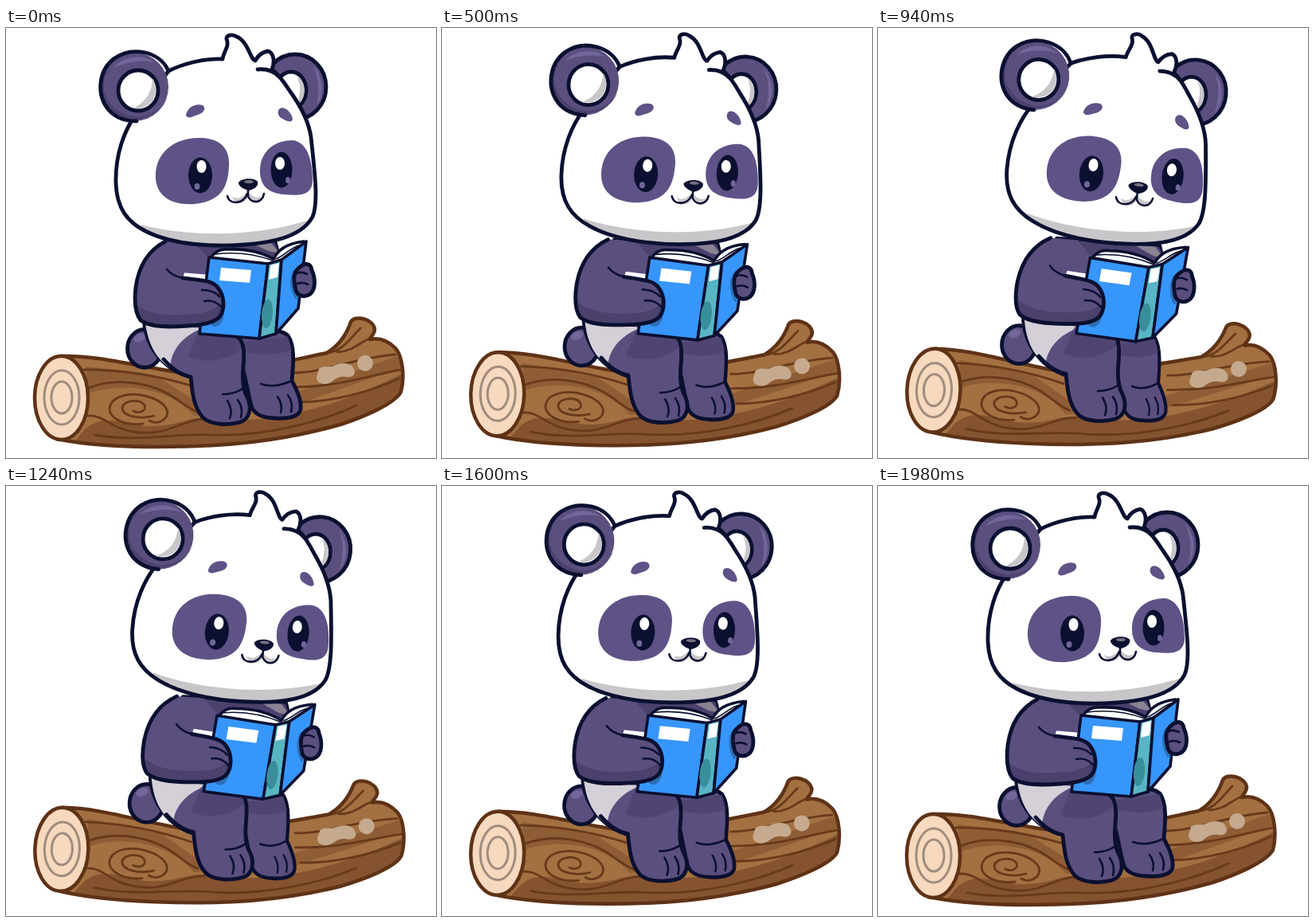
Animation, 540 px wide and 540 px high, one loop 2 s. Source, as an HTML page:

```html
<!DOCTYPE html>
<html lang="en">
<head>
<meta charset="utf-8">
<title>Reading panda</title>
<style>
html, body { margin: 0; height: 100%; overflow: hidden; background: #fff }
svg { display: block; width: 100vw; height: 100vh }
path, ellipse { stroke-linecap: round; stroke-linejoin: round }
.ink { stroke: #0b1030; stroke-width: 4.8 }
.edge { stroke: #0b1030; stroke-width: 3.6 }
.thin { stroke: #0b1030; stroke-width: 2.6; fill: none }
.fur { fill: #5b4f7f }
.dim { fill: #4b416c }
.lit { fill: #72669a }
.patch { fill: #5f5287 }
.white { fill: #fff }
.gray { fill: #c9c6ca }
.dark { fill: #0b1030 }
.bark { stroke: #5f3216; stroke-width: 4.5 }
.grain { stroke: #673a1b; stroke-width: 2.8; fill: none }
.ring { stroke: #a08b7f; stroke-width: 3; fill: none }
.none { fill: none }
</style>
</head>
<body>
<svg viewBox="0 0 540 540">
<defs>
  <clipPath id="logClip"><path id="logShape" d="M69 412C115 411 160 424 215 432C280 437 345 420 403 408C421 397 429 381 433 369C438 360 461 365 463 378C463 385 457 388 457 391C470 388 480 393 489 402C498 412 501 438 496 457C488 472 450 488 420 498C350 518 280 526 190 526C140 526 100 523 69 517Z"/></clipPath>
  <clipPath id="headClip"><path id="headShape" d="M162 110C148 130 137 160 138 195C139 226 152 244 177 256C212 273 262 275 300 272C345 269 374 258 385 237C393 219 387 175 383 137C380 116 370 98 357 80C350 69 343 59 334 52C338 42 336 31 329 29C322 30 317 34 313 41C307 40 304 17 290 11C284 7 276 9 277 14C281 23 273 30 272 39C248 38 222 45 204 54Z"/></clipPath>
  <clipPath id="armClip"><path id="armShape" d="M200 268C181 278 167 297 163 325C161 342 162 358 169 367C181 376 204 376 229 374C247 373 261 370 268 363C275 354 275 337 266 326C260 318 250 317 222 314L236 268Z"/></clipPath>
</defs>

<g id="log">
  <use href="#logShape" fill="#a37041"/>
  <g clip-path="url(#logClip)">
    <path fill="#85532f" d="M98 505C122 482 150 499 178 500C218 501 229 487 256 490C330 500 420 475 505 430V540H69Z"/>
    <path fill="#8f5d35" d="M100 425C125 428 150 432 195 441L240 470L360 459L500 409V425L360 475L236 487C205 450 145 445 104 459Z"/>
    <path class="grain" d="M98 429C140 429 185 435 232 449M104 452C142 437 188 447 214 466C226 474 231 479 241 482M103 487C121 485 132 503 160 507C204 514 218 492 250 491M112 511C165 521 215 508 260 511C330 513 400 493 440 474M362 433C402 432 438 414 489 410M363 451C420 450 458 436 496 429M370 470C410 469 455 458 494 440M403 408C422 407 433 389 445 377M416 407C435 407 446 393 457 390"/>
    <path class="grain" d="M172 497C148 500 130 490 130 478C131 464 150 458 170 461C192 465 206 476 202 487C197 496 186 497 180 493M186 487C166 492 146 487 146 477C147 467 170 465 174 474C177 480 168 485 160 481"/>
    <path fill="#c6aa8f" d="M393 428C398 423 407 427 412 424C420 420 429 420 434 424C442 433 437 440 426 438C418 437 413 441 408 445C398 450 389 445 390 438Z"/>
    <circle cx="451" cy="421" r="10" fill="#c6aa8f"/>
  </g>
  <use href="#logShape" class="bark none"/>
  <ellipse class="bark" cx="69.500" cy="464.500" rx="33.500" ry="52.500" fill="#f6d9be"/>
  <ellipse class="ring" cx="70" cy="464" rx="22" ry="34"/>
  <ellipse class="ring" cx="70" cy="464" rx="13" ry="20"/>
  <ellipse class="ink fur" cx="174" cy="402.500" rx="21.500" ry="24"/>
  <ellipse class="lit" cx="168" cy="389" rx="8" ry="5" transform="rotate(-25 168 389)"/>
</g>

<g id="body">
  <path class="ink fur" d="M208 268C190 300 172 346 174 374C180 410 207 435 240 440L325 405C340 375 350 300 337 266Z"/>
  <path fill="#d5cfd8" d="M175 371C179 399 189 415 206 427C207 406 220 388 246 377Z"/>
  <path class="dim" d="M235 269H337L346 290H255Z"/>
  <path fill="#8b8294" d="M306 269H332L344 283L329 280Z"/>
  <path class="white" d="M219 307L256 310V321L222 316Z"/>
</g>

<g id="legR">
  <path class="ink fur" d="M292 389C310 376 343 377 354 386C363 399 361 421 359 443C368 459 371 470 370 479C368 489 352 491 338 490C323 490 311 485 308 474C304 459 302 445 298 430Z"/>
  <path class="dim" d="M300 394L354 387L359 404C344 411 322 412 300 407Z" opacity=".65"/>
  <path class="thin" d="M320 447C332 451 345 449 356 444M341 463C346 470 347 476 345 483M354 461C359 468 360 475 358 482"/>
</g>
<g id="legL">
  <path class="fur" d="M244 379C230 397 225 419 232 438C234 457 235 475 247 489C257 499 280 499 294 495C307 491 308 476 304 466C299 457 296 448 298 425C300 402 298 391 288 386Z"/>
  <path class="dim" d="M241 383L292 386L297 401C282 417 253 423 229 413Z" opacity=".65"/>
  <path class="ink none" d="M198 416C210 430 221 436 232 438C234 457 235 475 247 489C257 499 280 499 294 495C307 491 308 476 304 466C299 457 296 448 298 425C300 402 298 391 288 386"/>
  <path class="thin" d="M272 460C281 460 291 457 297 453M278 468C283 476 284 483 281 490M291 467C296 474 297 482 295 489"/>
</g>

<g id="book">
  <path class="edge white" d="M257 289C262 281 268 277 278 278C299 277 320 281 336 290C341 280 350 271 374 268L372 276L346 295L328 297Z"/>
  <path class="thin" d="M263 284C287 281 313 284 335 292M339 290C350 286 354 278 368 273" style="stroke-width:1.6"/>
  <path class="edge" fill="#3796fc" d="M255 288L329 296L318 390L243 384Z"/>
  <path class="edge" fill="#58b5c4" d="M329 296L346 291L339 384L318 390Z"/>
  <path class="edge" fill="#3796fc" d="M346 291L377 268L367 352L339 384Z"/>
  <path class="white" d="M270 301L308 304L306 320L268 317Z"/>
  <path class="white" d="M332 298L343 295L341 313L330 316Z"/>
  <ellipse cx="328" cy="359" rx="7" ry="18" fill="#388e9d" transform="rotate(5 328 359)"/>
  <ellipse cx="263" cy="357" rx="11" ry="18" fill="#2c70b6"/>
  <path fill="#2c70b6" d="M361 304C354 315 357 332 364 341L368 337L370 305Z"/>
  <path class="ink fur" d="M367 302C376 293 383 296 384 304C389 315 389 328 382 334C374 340 365 335 364 329C361 318 361 307 367 302Z"/>
  <path class="thin" d="M365 308C369 306 374 307 378 309M366 321C371 319 375 320 379 322"/>
</g>

<g id="arm">
  <use href="#armShape" class="fur"/>
  <path class="dim" clip-path="url(#armClip)" d="M160 345C181 362 207 362 237 359C253 358 261 352 275 344V381H158Z"/>
  <path class="ink none" d="M200 268C181 278 167 297 163 325C161 342 162 358 169 367C181 376 204 376 229 374C247 373 261 370 268 363C275 354 275 337 266 326C260 318 250 317 222 314"/>
  <path class="thin" d="M222 314C212 312 206 308 202 303M246 329C255 329 263 332 268 337M249 343C258 341 266 345 270 350"/>
</g>

<g id="head">
  <ellipse class="ink fur" cx="363" cy="74" rx="39" ry="41"/>
  <path class="lit" d="M385 47C399 61 400 84 390 98C394 80 393 62 385 47Z"/>
  <ellipse class="ink white" cx="358" cy="78" rx="19" ry="23"/>
  <path class="gray" d="M365 60C378 68 378 90 365 97C370 82 371 72 365 60Z"/>
  <use href="#headShape" class="white"/>
  <path class="gray" clip-path="url(#headClip)" d="M169 247C225 262 312 264 384 240L390 280H170Z"/>
  <use href="#headShape" class="ink none"/>
  <path class="ink none" d="M316 52C325 51 335 53 343 61"/>
  <ellipse class="fur" cx="161" cy="74" rx="43" ry="43"/>
  <path class="dim" d="M128 53C114 76 128 107 164 112C180 110 193 104 201 91L204 85C194 112 159 122 139 111C116 96 112 67 128 53Z"/>
  <path class="lit" d="M135 50C148 35 171 32 186 43C168 39 151 43 135 50Z"/>
  <path class="ink none" d="M204 54C193 29 158 22 135 39C116 54 113 84 129 103C138 113 151 117 164 117"/>
  <ellipse class="ink white" cx="166" cy="78.500" rx="25" ry="25.500"/>
  <path class="gray" d="M184 63C195 82 184 103 159 101C174 94 183 83 184 63Z"/>
  <g id="face">
    <path class="patch" d="M226 110C227 99 239 94 247 97C252 101 248 107 241 109C234 111 230 115 226 110ZM344 101C350 98 359 106 360 115C358 120 351 116 347 114C341 111 340 104 344 101Z"/>
    <path class="patch" d="M188 182C190 154 214 138 242 138C268 138 281 150 280 172C279 201 270 217 237 221C206 223 186 210 188 182ZM319 176C321 152 340 141 360 141C378 143 385 165 385 192C384 210 370 211 350 209C327 207 318 196 319 176Z"/>
    <g class="eye" data-c="244 185">
      <ellipse class="dark" cx="244" cy="185" rx="15" ry="22.500"/>
      <ellipse class="white" cx="245.500" cy="174" rx="6" ry="8"/>
      <ellipse class="lit" cx="240" cy="199" rx="3.500" ry="4"/>
    </g>
    <g class="eye" data-c="346 178">
      <ellipse class="dark" cx="346" cy="178" rx="13.500" ry="22.500"/>
      <ellipse class="white" cx="344" cy="170" rx="6" ry="8"/>
      <ellipse class="lit" cx="354" cy="191" rx="3" ry="4"/>
    </g>
    <path class="gray" d="M284 212C293 217 298 210 303 206C310 211 314 215 321 211C317 221 308 219 303 214C297 223 288 222 284 212Z"/>
    <path class="thin" d="M278 211C281 223 299 221 303 208C306 222 322 221 324 208M304 200V210"/>
    <path class="dark" d="M292 194C297 188 312 188 316 193C318 198 311 203 305 204C299 203 291 198 292 194Z"/>
    <ellipse cx="305" cy="193" rx="6" ry="2" fill="#77717f"/>
  </g>
</g>
</svg>
<script>
const LOOP = 2000, BLINK = 320, BLINK_HALF = 150;
const $ = id => document.getElementById(id);
const eyes = document.querySelectorAll('.eye');
const move = (id, transform) => $(id).setAttribute('transform', transform);

function draw() {
  const t = performance.now() % LOOP;
  const sway = (1 - Math.cos(2 * Math.PI * t / LOOP)) / 2;
  const turn = (id, angle, x, y) => move(id, `rotate(${angle * sway} ${x} ${y})`);

  turn('log', 2.5, 286, 470);
  turn('body', 4.5, 265, 480);
  turn('arm', 4.5, 265, 480);
  turn('book', 3.3, 254, 490);
  turn('head', 6, 315, 416);
  move('face', `translate(0 ${4 * sway})`);
  move('legL', `translate(${4 * sway} ${-4 * sway})`);
  move('legR', `translate(312 ${3 * sway}) scale(${1 - .15 * sway} 1) translate(-312 0)`);

  const open = Math.min(1, .1 + .9 * Math.abs(t - BLINK) / BLINK_HALF);
  for (const eye of eyes) {
    const [x, y] = eye.dataset.c.split(' ');
    eye.setAttribute('transform', `translate(${x} ${y}) scale(1 ${open}) translate(${-x} ${-y})`);
  }
  requestAnimationFrame(draw);
}
draw();
</script>
</body>
</html>
```
